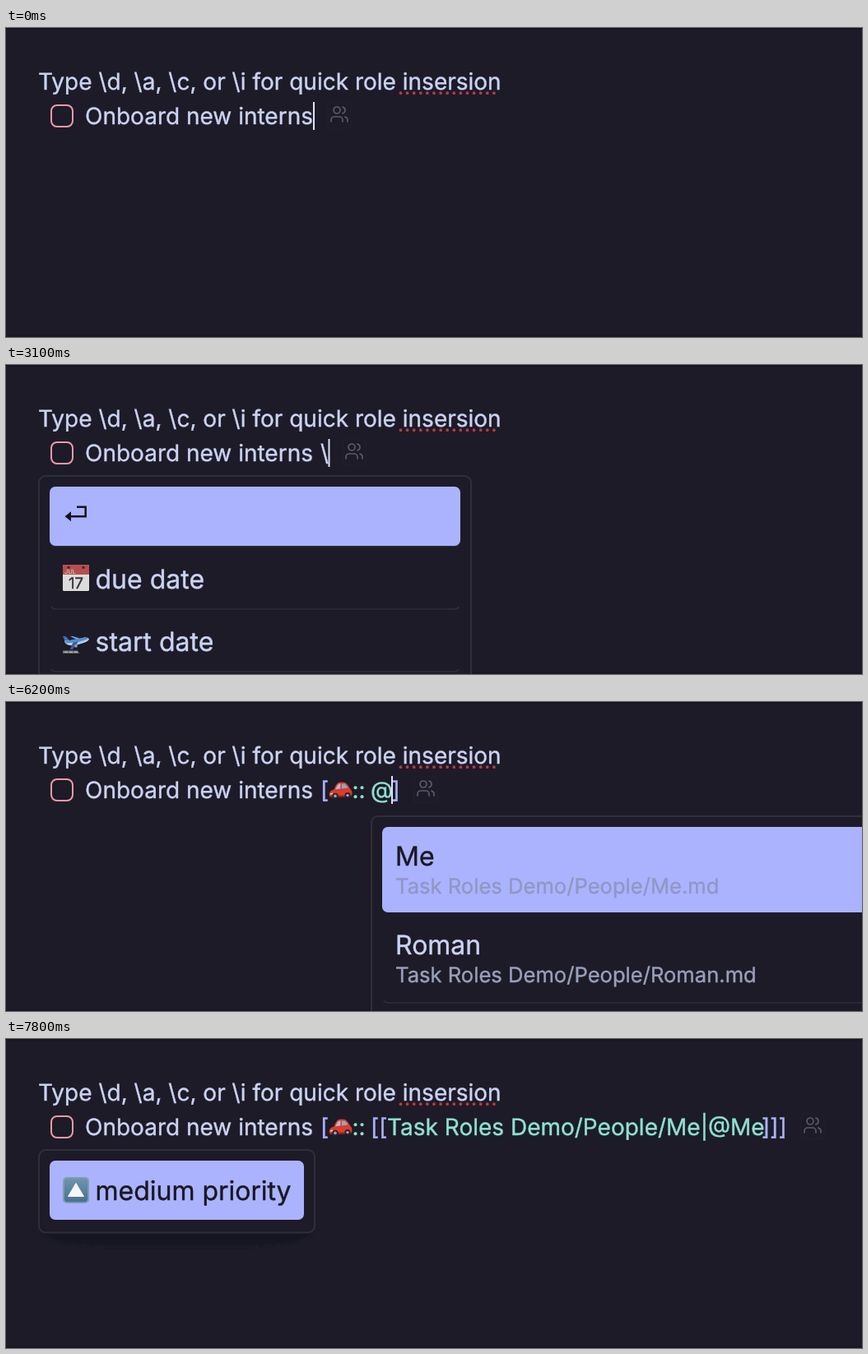
Write an HTML page that moves like this. It is 1040x376 px and loops after 8 s.

```html
<!DOCTYPE html>
<html lang="en">
<head>
<meta charset="utf-8">
<title>Quick role insertion</title>
<style>
html, body { margin: 0; width: 100%; height: 100%; overflow: hidden; background: #1d1b28; }
svg { display: block; width: 1040px; height: 376px; }
text { --c: #cbd3f2; font-family: Inter, sans-serif; font-size: 28px; font-optical-sizing: none; text-rendering: geometricPrecision; white-space: pre; }
text, tspan { fill: var(--c); stroke: var(--c); stroke-width: 0.4px; }
.item { font-size: 32px; }
.path { --c: #9a9fba; font-size: 25.6px; }
.dark { --c: #1a1823; }
.dim { --c: #9197c4; }
.hit { --c: #6abcee; font-weight: 700; }
.teal { --c: #8fe1d0; }
.lilac { --c: #abb3fb; }
.box { fill: #1d1b28; stroke: #312e3c; stroke-width: 2; }
.sel { fill: #abb3fe; }
.rule { fill: none; stroke: #302d3b; stroke-width: 1.6; }
.off { display: none; }
</style>
</head>
<body>
<svg viewBox="0 0 1040 376">
  <defs>
    <linearGradient id="btn" x2="0" y2="1">
      <stop offset="0" stop-color="#6f94ae"/><stop offset="1" stop-color="#4b6f8e"/>
    </linearGradient>
    <filter id="soft" x="-10%" y="-60%" width="120%" height="220%"><feGaussianBlur stdDeviation="1.5"/></filter>
    <g id="shade"><path d="M43-6V0Q50 15 115 17H300Q366 15 373 0V-6Z" fill="#171520" filter="url(#soft)"/></g>
    <g id="up">
      <rect width="32" height="32" rx="5" fill="#7f9fb4"/>
      <rect x="1.8" y="1.8" width="28.4" height="28.4" rx="4" fill="url(#btn)"/>
      <path d="M16 7.5L25.5 23.5H6.5Z" fill="#f3f6fa" stroke="#f3f6fa" stroke-linejoin="round"/>
    </g>
    <g id="cal">
      <rect width="32" height="32" rx="1.5" fill="#dddcdd"/>
      <path d="M0 12V1.5Q0 0 1.5 0H30.5Q32 0 32 1.5V12Z" fill="#b3504e"/>
      <circle cx="7" cy="3.4" r="1.7" fill="#4a2427"/><circle cx="25" cy="3.4" r="1.7" fill="#4a2427"/>
      <text x="2" y="10.6" style="--c:#eccfcd;font-size:7.5px;stroke:none">JUL</text>
      <text x="16" y="28.5" text-anchor="middle" style="--c:#34333a;font-size:18.5px">17</text>
    </g>
    <g id="plane">
      <path d="M0 21.5H18L20 25H0Z" fill="#6f746f"/>
      <path d="M2 23.2H18" stroke="#c9ccc4" stroke-dasharray="4 2"/>
      <path d="M0 4L4 4.5L9 10L3 10.5Z" fill="#3d73c0"/>
      <path d="M2 9.5Q15 9 26 5.5Q31 5 32 7.5Q31 10.5 24 12.5Q12 16.5 6 14.5Q2 12.5 2 9.5Z" fill="#bccde2"/>
      <path d="M2.5 9.7Q15 9 26 5.5Q30 5.4 31 7Q22 11.5 4 12.5Z" fill="#4e8bd6"/>
      <path d="M19 10.5L12 20L8.5 20.5L12.5 11.5Z" fill="#3a5f98"/>
      <path d="M16 8L9 4H12L21 6.8Z" fill="#6fa1dc"/>
      <circle cx="16" cy="15.8" r="1.9" fill="#8fa3bd"/>
    </g>
    <g id="flag"></g>
    <g id="car">
      <path d="M1 13.5Q2 10.5 6.5 9.5Q8.5 3.5 11.5 1.3Q15.5 0 20.5 1.2Q24.5 4 26 8.5Q28.8 10.5 28.5 15.5Q28.2 17.5 26 17.8L3 19Q0 18.4 1 13.5Z" fill="#dd3b30"/>
      <path d="M8.3 9.2Q9.8 4.6 12.2 2.8L14.6 2.6L14.2 8.6Z" fill="#a9c0cd"/>
      <path d="M16.1 2.5L19.8 2.8Q22.4 4.8 23.4 7.6L15.8 8.5Z" fill="#8fa9b8"/>
      <path d="M2 14.3L5 13.5L5.4 15.2L1.8 15.6Z" fill="#f5dfa4"/>
      <path d="M1 17.2L28 16.2L27.6 18L3 19.4Z" fill="#8b2220"/>
      <circle cx="8" cy="17.4" r="3.7" fill="#26242c"/><circle cx="8" cy="17.4" r="1.8" fill="#a4a6ad"/>
      <circle cx="23" cy="16.6" r="3.5" fill="#26242c"/><circle cx="23" cy="16.6" r="1.7" fill="#a4a6ad"/>
    </g>
  </defs>

  <rect width="1040" height="376" fill="#1d1b28"/>
  <rect width="1040" height="1.5" fill="#15131c"/>
  <rect y="374" width="1040" height="2" fill="#191722"/>

  <text x="39" y="75">Type \d, \a, \c, or \i for quick role insersion</text>
  <path d="M479.5 79.2H595" stroke="#bd3a3c" stroke-width="3.8" stroke-linecap="round" stroke-dasharray="0 8.1"/>
  <rect x="55" y="94" width="26" height="26" rx="7" fill="none" stroke="#ec9aa8" stroke-width="2"/>
  <text x="96" y="117">Onboard new interns</text>
  <text id="slash" x="382" y="117">\</text>
  <g id="role">
    <text class="lilac" x="382" y="117">[</text>
    <use href="#car" x="392" y="97"/>
    <text class="teal" x="420.5" y="117">::</text>
    <text class="lilac" id="open" x="443" y="117">[[</text>
    <text class="teal" id="value" y="117"></text>
    <text class="lilac" id="shut" x="918" y="117">]]</text>
    <text class="lilac" id="close" y="117">]</text>
  </g>
  <rect id="caret" y="90" width="2" height="34" fill="#dde2f6"/>
  <g id="icon" fill="none" stroke="#5b586b" stroke-width="1.7" stroke-linecap="round" stroke-linejoin="round">
    <rect x="-2" y="-2" width="28" height="31" rx="4" stroke="#23212d" stroke-width="1.2"/>
    <path d="M16 21v-2a4 4 0 0 0-4-4H6a4 4 0 0 0-4 4v2M22 21v-2a4 4 0 0 0-3-3.87M16 3.13a4 4 0 0 1 0 7.75"/>
    <circle cx="9" cy="7" r="4"/>
  </g>

  <g id="full">
    <rect class="box" x="40" y="135" width="525" height="260" rx="8"/>
    <path class="rule" d="M55 218Q56 220.5 61 220.5H544Q549 220.5 550 218M55 294Q56 297 61 297H544Q549 297 550 294M55 370Q56 373 61 373H544Q549 373 550 370"/>
    <rect class="sel" x="53" y="148" width="499" height="72" rx="7"/>
    <path d="M86 172.7H96.7V184.3H78" fill="none" stroke="#15131e" stroke-width="2.5"/>
    <path d="M71.5 184.3L79 178.3V190.3Z" fill="#15131e"/>
    <use href="#cal" x="69" y="243"/>
    <text class="item" x="108.5" y="271.5">due date</text>
    <use href="#plane" x="69" y="326"/>
    <text class="item" x="108.5" y="347.5">start date</text>
  </g>

  <g id="prio">
    <use id="prioShade" href="#shade"/>
    <rect class="box" id="prioBox" x="40" y="135" width="335" rx="8"/>
    <rect class="sel" x="53" y="148" width="309" height="72" rx="7"/>
    <use href="#up" x="69" y="168"/>
    <text class="item dark" x="108.5" y="195.5">medium priority</text>
    <g id="done">
      <use href="#flag" x="69" y="247"/>
      <text class="item" x="108.5" y="271.5">on completion</text>
    </g>
  </g>

  <g id="people">
    <rect class="box" id="peopleBox" x="444" y="139" rx="8"/>
    <rect class="sel" id="peopleSel" x="457" y="152" height="104" rx="7"/>
    <text class="item dark" x="473" y="199"><tspan id="m1">M</tspan><tspan id="e1">e</tspan></text>
    <text class="path dim" x="473" y="233">Task Roles Demo/People/Me.md</text>
    <g id="second">
      <text class="item" x="473" y="307">Ro<tspan id="m2">m</tspan>an</text>
      <text class="path" x="473" y="341">Task Roles Demo/People/Roman.md</text>
      <path class="rule" d="M459 363Q460 366 465 366H1040"/>
    </g>
  </g>
</svg>
<script>
const LOOP = 8000;
const $ = id => document.getElementById(id);
const set = (id, attrs) => { for (const k in attrs) $(id).setAttribute(k, attrs[k]); };
const show = (id, on) => $(id).classList.toggle('off', !on);
const mark = (id, on) => $(id).classList.toggle('hit', on);

// Waving chequered cloth on a pole
function drawFlag() {
  const wave = x => 2 - 2 * Math.sin((x - 2) / 4.4);
  let out = '<path d="M2 3L5 26" stroke="#8a8078" stroke-width="1.8"/>';
  for (let c = 0; c < 7; c++) for (let r = 0; r < 4; r++) {
    const x = 2 + c * 4 + r * 0.5, y = 2 + r * 4.3, a = y + wave(x), b = y + wave(x + 4);
    out += `<path d="M${x} ${a}L${x + 4} ${b}l.5 4.3L${x + 0.5} ${a + 4.3}Z" fill="${(c + r) % 2 ? '#dcdce0' : '#2d2c33'}"/>`;
  }
  $('flag').innerHTML = out;
}

// at: start, text: typed part, x: caret, end: end of line
const steps = [
  { at: 0, text: '', x: 374, end: 374 },
  { at: 100, text: '', x: 382, end: 382 },
  { at: 200, text: '', x: 382, end: 382, menu: 'full' },
  { at: 1800, text: '\\', x: 392.5, end: 392 },
  { at: 2900, text: '\\', x: 392.5, end: 392, menu: 'full' },
  { at: 4300, text: '[]', x: 443, end: 453, menu: 'full' },
  { at: 6000, text: '@', x: 469, end: 479, people: 2, typed: 0 },
  { at: 6300, text: '@m', x: 494, end: 504, menu: 'two', people: 2, typed: 1 },
  { at: 6800, text: '@me', x: 510, end: 520, menu: 'one', people: 1, typed: 2 },
  { at: 7100, text: 'Task Roles Demo/People/Me|@Me', x: 938, end: 949, menu: 'one' }
];
// caret visible from, to
const blink = [[0, 700], [1200, 1800], [2900, 3400], [3900, 4900], [5400, 5900], [6000, 7600]];

function draw(t) {
  const s = steps.filter(p => p.at <= t).pop();
  const role = s.at >= 4300, linked = s.at >= 7100;

  show('slash', s.text === '\\');
  show('role', role);
  if (role) {
    $('value').textContent = s.text === '[]' ? '' : s.text;
    set('value', { x: linked ? 463 : 443 });
    set('close', { x: s.end - 10.5 });
    show('open', linked);
    show('shut', linked);
  }
  set('caret', { x: s.x - 1 });
  show('caret', blink.some(([a, b]) => t >= a && t < b));
  set('icon', { transform: `translate(${s.end + 19} 93)` });

  const two = s.menu === 'two';
  show('full', s.menu === 'full');
  show('prio', two || s.menu === 'one');
  show('done', two);
  set('prioBox', { height: two ? 176 : 100.5 });
  set('prioShade', { y: two ? 311 : 235.5 });

  show('people', !!s.people);
  if (s.people) {
    const wide = s.people === 2;
    show('second', wide);
    set('peopleBox', { width: wide ? 640 : 450, height: wide ? 260 : 130 });
    set('peopleSel', { width: wide ? 610 : 424 });
    mark('m1', s.typed > 0);
    mark('e1', s.typed > 1);
    mark('m2', s.typed > 0);
  }
}

drawFlag();
draw(0);
let start;
function tick(now) {
  start ??= now;
  draw((now - start) % LOOP);
  requestAnimationFrame(tick);
}
requestAnimationFrame(tick);
</script>
</body>
</html>
```
